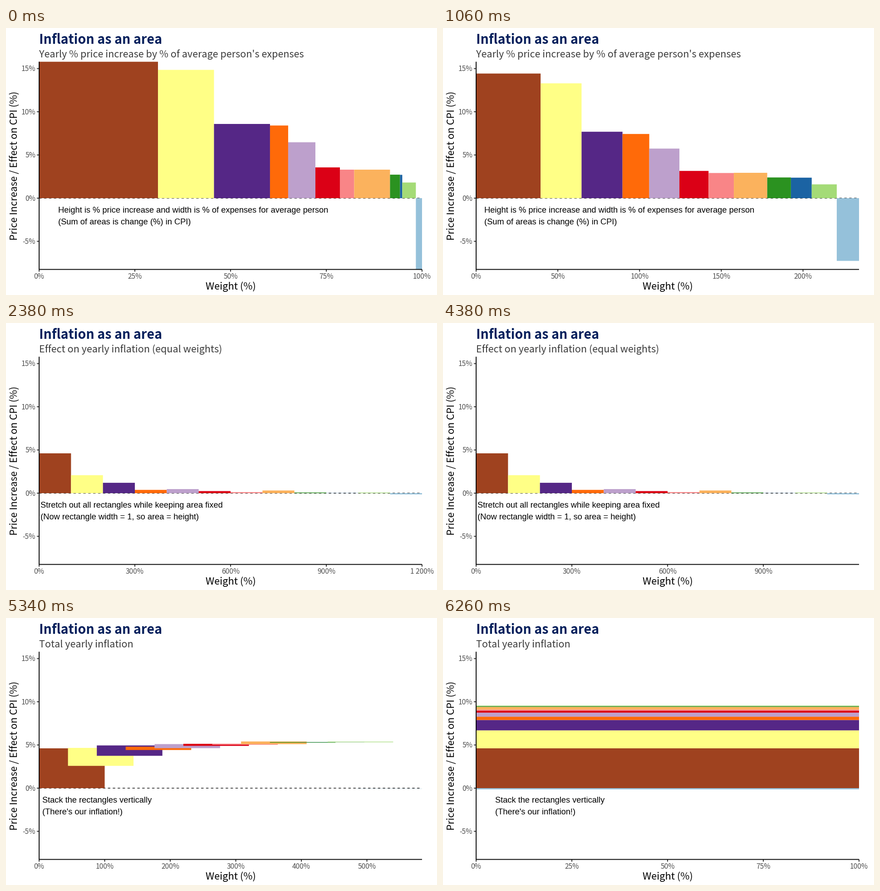
Write a matplotlib script that moves like this. It is 950 by 590 pixels and loops after 8 s.

```python
import math

import matplotlib.pyplot as plt
import numpy as np
from matplotlib.animation import FuncAnimation
from matplotlib.patches import Rectangle

W, H, DPI = 950, 590, 100
LOOP, TICK, STEP, STEPS = 8000, 20, 40, 48
STARTS = (500, 4380)

LEFT, RIGHT, TOP, BOTTOM = 73, 917, 74.5, 533.5
ZERO, PER_PCT = 376, 19.09

SANS, ARIAL = "Noto Sans CJK JP", "Liberation Sans"
COLORS = ["#9f421f", "#ffff86", "#552786", "#ff6a09", "#bda0cc", "#db0016",
          "#f98587", "#fbb25d", "#2b9220", "#1b63a3", "#a4db77", "#95c1da"]
WEIGHTS = np.array([31.04, 14.63, 14.63, 4.74, 7.11, 6.40,
                    3.73, 9.36, 2.61, 0.59, 3.55, 1.61])
RISES = np.array([15.79, 14.85, 8.59, 8.41, 6.47, 3.56,
                  3.30, 3.30, 2.72, 2.70, 1.81, -8.25])
EFFECTS = np.array([4.61, 2.08, 1.20, 0.38, 0.47, 0.24,
                    0.12, 0.31, 0.07, 0.015, 0.065, -0.14])
SUBTITLES = ["Yearly % price increase by % of average person's expenses",
             "Effect on yearly inflation (equal weights)",
             "Total yearly inflation"]
NOTES = [("Height is % price increase and width is % of expenses for average person",
          "(Sum of areas is change (%) in CPI)"),
         ("Stretch out all rectangles while keeping area fixed",
          "(Now rectangle width = 1, so area = height)"),
         ("Stack the rectangles vertically", "(There's our inflation!)")]


def make_states():
    """Rows of left, right, low, high for the three layouts."""
    n = len(WEIGHTS)
    zero, full = np.zeros(n), np.full(n, 100.0)
    ends = np.cumsum(WEIGHTS) / WEIGHTS.sum() * 100
    tops = np.cumsum(EFFECTS)
    lows = tops - EFFECTS
    lows[-1], tops[-1] = EFFECTS[-1], 0
    slots = np.arange(n) * 100.0
    return [np.array([np.append(0, ends[:-1]), ends, zero, RISES]),
            np.array([slots, slots + 100, zero, EFFECTS]),
            np.array([zero, full, lows, tops])]


def ease(t):
    return 4 * t ** 3 if t < 0.5 else 1 - 4 * (1 - t) ** 3


def axis_breaks(limit, want=5):
    """Pick round axis steps by simplicity, coverage and density."""
    best, step = -math.inf, 1
    power = math.floor(math.log10(limit))
    for rank, q in enumerate((1, 5, 2, 2.5, 4, 3)):
        for z in (power - 1, power):
            size = q * 10 ** z
            for k in range(2, 11):
                end = size * (k - 1)
                cover = 1 - 0.5 * ((limit - end) / (0.1 * limit)) ** 2
                ratio = (k - 1) / end * max(end, limit) / (want - 1)
                density = 2 - max(ratio, 1 / ratio)
                score = 0.25 * (1 - rank / 5) + 0.2 * cover + 0.5 * density
                if score > best:
                    best, step = score, size
    return np.arange(0, limit + 1e-6, step)


def y_px(v):
    return ZERO - v * PER_PCT


fig = plt.figure(figsize=(W / DPI, H / DPI), dpi=DPI, facecolor="white")
ax = fig.add_axes([0, 0, 1, 1])
ax.set(xlim=(0, W), ylim=(H, 0))
ax.axis("off")


def text(x, y, s, px, color="black", font=SANS, **kw):
    return ax.text(x, y, s, fontsize=px * 72 / DPI, color=color, family=font,
                   va="baseline", **kw)


def line(xs, ys, px, color="black", **kw):
    return ax.plot(xs, ys, color=color, lw=px * 72 / DPI, snap=False,
                   solid_capstyle="butt", dash_capstyle="butt", **kw)[0]


text(LEFT, 35, "Inflation as an area", 28.7, "#06205c", weight="bold")
subtitle = text(LEFT, 65, "", 21.55, "#3b3b3b")
text((LEFT + RIGHT) / 2, 578, "Weight (%)", 21.85, ha="center")
text(24.5, 304, "Price Increase / Effect on CPI (%)", 21.85, ha="center",
     rotation=90, rotation_mode="anchor")

line([LEFT, RIGHT], [ZERO, ZERO], 1.3525, zorder=1, dashes=(4, 4))
bars = [ax.add_patch(Rectangle((0, 0), 0, 0, fc=c, lw=0, snap=False, zorder=2))
        for c in COLORS]
line([LEFT, LEFT, RIGHT], [TOP, BOTTOM, BOTTOM], 1.9, zorder=3,
     solid_joinstyle="miter")

for v in range(-5, 16, 5):
    line([LEFT - 5, LEFT], [y_px(v)] * 2, 1.9, "#333333")
    text(65, y_px(v) + 5.7, f"{v}%", 15.5, "#4d4d4d", ha="right")

x_ticks = [line([0, 0], [BOTTOM, BOTTOM + 5], 1.9, "#333333")
           for _ in range(12)]
x_labels = [text(0, 553.5, "", 15.5, "#4d4d4d", ha="center") for _ in x_ticks]
notes = [text(0, y, "", 18.25, font=ARIAL, zorder=4) for y in (408, 434)]

states = make_states()


def draw(i):
    now = i * TICK
    first, second = (min(max((now - s) // STEP + 1, 0), STEPS) for s in STARTS)
    a, k = (1, second) if second else (0, first)
    p = ease(k / STEPS)
    left, right, low, high = states[a] * (1 - p) + states[a + 1] * p
    limit = right.max()

    def x_px(v):
        return LEFT + v * (RIGHT - LEFT) / limit

    for bar, l, r, lo, hi in zip(bars, left, right, low, high):
        bar.set_bounds(x_px(l), y_px(max(lo, hi)), x_px(r) - x_px(l),
                       abs(hi - lo) * PER_PCT)

    breaks = axis_breaks(limit)
    for j, (tick, label) in enumerate(zip(x_ticks, x_labels)):
        shown = j < len(breaks)
        tick.set_visible(shown)
        label.set_visible(shown)
        if shown:
            x = x_px(breaks[j])
            tick.set_xdata([x, x])
            label.set_x(x)
            label.set_text(f"{breaks[j]:,.0f}%".replace(",", " "))

    stage = a + (k >= STEPS // 2)
    subtitle.set_text(SUBTITLES[stage])
    for note, words in zip(notes, NOTES[stage]):
        note.set_x(x_px(5) - 0.5)
        note.set_text(words)
    return []


anim = FuncAnimation(fig, draw, frames=LOOP // TICK, interval=TICK,
                     init_func=lambda: draw(0), repeat=True, repeat_delay=0)
plt.show()
```
